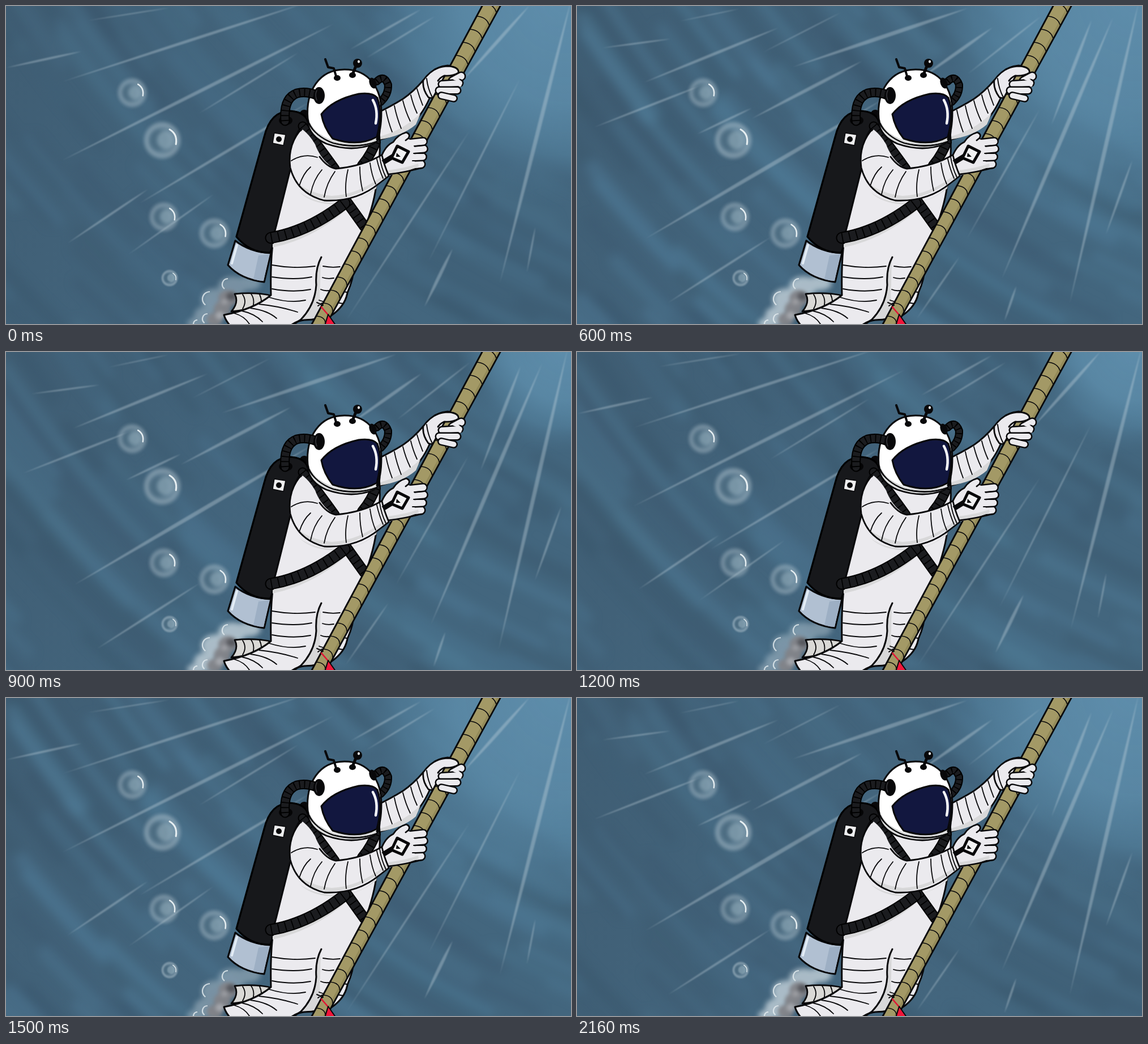
Animation of 998 by 561 pixels, one loop 2400 ms. Source, as an HTML page:

```html
<!DOCTYPE html>
<html lang="en">
<head>
<meta charset="utf-8">
<title>Diver on a rope</title>
<style>
  html, body { margin: 0; width: 100%; height: 100%; overflow: hidden; background: #45677f; }
  svg { display: block; width: 100%; height: 100%; }
</style>
</head>
<body>
<svg id="stage" viewBox="0 0 998 561" preserveAspectRatio="none"></svg>
<script>
const SUIT = '#ebeaee', SHADE = '#d8d8d9', INK = '#08080a', RUBBER = '#1b1c1f';

const rng = seed => () => {
  seed = (seed * 1664525 + 1013904223) >>> 0;
  return seed / 4294967296;
};
const path = (d, fill = 'none', stroke = INK, w = 3, extra = '') =>
  `<path d="${d}" fill="${fill}" stroke="${stroke}" stroke-width="${w}" ${extra}/>`;
const oval = (x, y, rx, ry, fill, extra = '') =>
  `<ellipse cx="${x}" cy="${y}" rx="${rx}" ry="${ry}" fill="${fill}" ${extra}/>`;
const group = (body, attrs = '') => `<g ${attrs}>${body}</g>`;

const blurs = [1, 3, 5, 9].map(n =>
  `<filter id="b${n}" filterUnits="userSpaceOnUse" x="-60" y="-60" width="1118" height="681" color-interpolation-filters="sRGB"><feGaussianBlur stdDeviation="${n}"/></filter>`).join('');
const glow = (id, r) =>
  `<radialGradient id="${id}" gradientUnits="userSpaceOnUse" cx="985" cy="-10" r="${r}">
    <stop offset="0" stop-color="#5e8dab"/><stop offset=".5" stop-color="#5a88a5" stop-opacity=".95"/>
    <stop offset=".75" stop-color="#5583a0" stop-opacity=".6"/><stop offset="1" stop-color="#4a718c" stop-opacity="0"/>
  </radialGradient>`;
const defs = `<defs>${blurs}${glow('wide', 365)}${glow('full', 385)}${glow('small', 190)}
  <linearGradient id="water" x1="0" y1="0" x2="1" y2="0.3">
    <stop offset="0" stop-color="#3f5d73"/><stop offset=".55" stop-color="#43657d"/><stop offset="1" stop-color="#43667e"/>
  </linearGradient></defs>`;

// Soft ripples: shallow arcs around a point far beyond the top right corner.
function water(seed, light, dark, glowId) {
  const rnd = rng(seed), cx = 1700, cy = -1100;
  let arcs = '';
  for (let r = 1300; r < 2420; r += 13) {
    const at = a => `${(cx + r * Math.cos(a)).toFixed(0)},${(cy + r * Math.sin(a)).toFixed(0)}`;
    for (let k = 0; k < 2; k++) {
      const a = 1.8 + rnd() * 0.75, span = 0.07 + rnd() * 0.17;
      const bright = rnd() < 0.5;
      arcs += path(`M${at(a)}A${r},${r} 0 0 1 ${at(a + span)}`, 'none',
        bright ? '#507c98' : '#385368', 12 + rnd() * 18,
        `opacity="${(bright ? light : dark) * (0.5 + rnd() * 0.5)}"`);
    }
  }
  return `<rect width="998" height="561" fill="url(#water)"/>` +
    group(arcs, 'filter="url(#b9)" stroke-linecap="round"') +
    `<rect width="998" height="561" fill="url(#${glowId})"/>`;
}

// Each ray is a thin spindle: two ends and a width.
function rays(list) {
  let out = '';
  for (let i = 0; i < list.length; i += 5) {
    const [x1, y1, x2, y2, w] = list.slice(i, i + 5);
    const len = Math.hypot(x2 - x1, y2 - y1);
    const nx = (y1 - y2) / len * w, ny = (x2 - x1) / len * w;
    const mx = x1 + (x2 - x1) * 0.6, my = y1 + (y2 - y1) * 0.6;
    out += path(`M${x1},${y1}Q${mx + nx},${my + ny} ${x2},${y2}Q${mx - nx},${my - ny} ${x1},${y1}Z`, '#c3d3dc', 'none', 0);
  }
  return group(out, 'opacity=".37" filter="url(#b1)"');
}

const raysA = rays([
  143, 26, 290, 3, 2, 0, 109, 134, 80, 4, 98, 134, 525, -4, 5, 98, 273, 580, 31, 6,
  340, 190, 517, 82, 3, 607, 77, 733, 6, 4, 636, 92, 758, 18, 3, 108, 419, 251, 323, 4,
  215, 439, 367, 332, 3, 236, 348, 535, 170, 5, 739, 531, 789, 428, 6, 745, 453, 908, 128, 3,
  805, 133, 924, 0, 6, 872, 490, 998, -10, 7, 920, 470, 935, 390, 3, 600, 556, 819, 220, 3]);
const raysB = rays([
  44, 74, 166, 58, 3, 180, 27, 287, 5, 2, 118, 135, 357, 38, 5, 30, 214, 225, 138, 4,
  212, 226, 309, 180, 4, 328, 82, 467, 11, 2, 308, 199, 504, 97, 6, 380, 108, 690, 4, 7,
  120, 411, 540, 165, 7, 160, 524, 342, 408, 4, 605, 129, 734, 38, 6, 690, 120, 820, 18, 3,
  838, 210, 909, 25, 6, 750, 482, 947, 20, 7, 870, 526, 992, -6, 7, 934, 404, 981, 272, 4,
  600, 552, 676, 442, 3, 755, 556, 776, 494, 4, 688, 412, 817, 183, 3]);

function bubble(x, y, r) {
  const soft = `filter="url(#b${r < 20 ? 1 : 3})"`;
  return group(
    oval(0, 0, r * 1.05, r * 1.05, '#a3b8c4', `opacity=".32" ${soft}`) +
    `<circle r="${r * 0.88}" fill="none" stroke="#c3d1d9" stroke-width="${r * 0.22}" opacity=".3" ${soft}/>` +
    oval(-r * 0.2, 0, r * 0.52, r * 0.58, '#46667b', `opacity=".75" ${soft}`) +
    oval(r * 0.2, -r * 0.02, r * 0.5, r * 0.52, '#8ba6b5', `opacity=".7" ${soft}`) +
    path(`M${r * 0.42},${-r * 0.62}Q${r * 0.88},${-r * 0.35} ${r * 0.78},${r * 0.22}`, 'none', '#e6eef1', r * 0.1),
    `transform="translate(${x},${y})" stroke-linecap="round"`);
}
const bubbles = bubble(223, 153, 24) + bubble(276, 237, 31) + bubble(279, 372, 24) +
  bubble(368, 401, 25) + bubble(289, 480, 14);

function smoke(white) {
  const puffs = [[428, 489, 22, 13], [400, 495, 25, 18], [370, 518, 25, 20], [352, 547, 20, 17], [336, 560, 16, 10]];
  const soot = [[392, 516, 17, 15], [382, 535, 15, 15], [369, 553, 14, 12]];
  const ring = (x, y, r) => path(`M${x},${y - r}A${r},${r} 0 0 0 ${x - r * 0.6},${y + r * 0.8}`, 'none', '#e9f0f3', 2.2, 'opacity=".8"');
  return group(puffs.map(p => oval(...p, '#bccbd4')).join(''), `opacity="${white}" filter="url(#b5)"`) +
    ring(392, 491, 10) + ring(360, 517, 13) + ring(356, 552, 9) + ring(338, 561, 7) +
    group(soot.map(p => oval(...p, '#828388')).join('') + oval(398, 512, 9, 7, '#56565b') +
      oval(378, 546, 8, 7, '#a9aaae') + oval(386, 522, 6, 5, '#9d9ea2'), 'opacity=".95" filter="url(#b3)"');
}

// Ribbed rubber: outline, core and cross ribs along one path.
const ribbed = (d, w, gap = 9) => path(d, 'none', '#000', w) + path(d, 'none', RUBBER, w - 4) +
  path(d, 'none', '#000', w - 3, `stroke-dasharray="1.8 ${gap}" stroke-linecap="butt"`);

const finger = (x1, y1, x2, y2, w) =>
  path(`M${x1},${y1}L${x2},${y2}`, 'none', INK, w + 5) + path(`M${x1},${y1}L${x2},${y2}`, 'none', SUIT, w);
const seams = (d, w = 1.8) => path(d, 'none', INK, w);

const tank =
  oval(527, 190, 8, 7, INK) +
  path('M405,414L392,457Q414,482 456,487L468,436Q430,434 405,414Z', '#b1c0d2', INK, 3.2) +
  path('M446,440L437,482Q448,485 455,485L465,438Z', '#9dafc4', 'none', 0) +
  path('M408,422L399,454', 'none', '#e4edf6', 4) +
  path('M407,407L456,231Q467,185 502,185Q530,187 534,207L520,290L467,435Q431,436 407,407Z', '#17181b', '#000', 3.2) +
  path('M474,224L494,227L490,246L471,242Z', '#eeeeef', INK, 1.4) + oval(482, 235, 5, 5, INK);

const backArm =
  path('M655,189Q680,177 701,164Q720,151 737,131L748,163Q734,195 711,213Q692,228 656,237Z', SUIT, INK, 2.8) +
  path('M657,231Q692,222 716,203L732,190L724,209Q700,230 657,236Z', SHADE, 'none', 0) +
  seams('M671,184Q675,204 682,222M686,176Q690,196 698,216M701,167Q706,187 714,203M715,157Q719,174 726,189M726,146Q730,160 736,175') +
  path('M737,131Q754,107 780,105Q796,106 799,116L782,145Q761,167 746,161Q735,146 737,131Z', SUIT, INK, 2.8) +
  seams('M743,128Q745,146 753,161', 2);

const body =
  path('M404,508Q438,504 470,511Q456,533 398,539Q412,523 404,508Z', '#dad9d6', INK, 2.8) +
  seams('M418,509Q426,521 418,534M433,508Q440,518 436,531M448,509Q452,517 451,527') +
  path('M524,210Q500,240 503,285L478,385Q466,425 468,510Q438,535 385,545Q388,556 398,566L500,566Q511,556 526,554Q556,553 576,545Q599,529 603,506Q614,482 615,456L637,384Q655,332 655,300Q663,265 659,222Z', SUIT, INK, 3) +
  path('M556,446Q547,466 549,492Q547,527 525,552Q557,552 570,540Q551,535 555,492Z', SHADE, 'none', 0) +
  path('M471,420Q538,406 600,355L601,360Q540,412 471,426Z', SHADE, 'none', 0) +
  path('M518,328Q548,351 602,347Q640,338 655,316L654,322Q615,354 565,349Q535,345 518,328Z', SHADE, 'none', 0) +
  path('M557,443Q546,463 548,492Q546,527 521,553Q509,561 503,566', 'none', INK, 3) +
  seams('M470,457Q508,464 546,459M470,478Q509,484 540,478M470,499Q507,506 538,500M465,514Q500,525 529,519' +
    'M447,526Q485,530 515,540M432,533Q462,537 478,551M417,538Q440,543 453,557M403,542Q421,547 430,561' +
    'M560,459Q575,462 590,460M559,479Q568,482 579,480M556,500Q562,503 570,502M553,519L562,522' +
    'M603,464L614,461M596,484L609,482M588,503L603,505M577,522L595,525');

const straps =
  ribbed('M524,212Q546,238 581,287', 17) +
  ribbed('M653,240Q645,262 629,281', 18) +
  ribbed('M600,343L633,389', 19) +
  ribbed('M468,409Q534,398 598,348', 21, 11);

const helmet =
  ribbed('M655,133Q668,120 675,139Q676,156 662,169', 14, 6) +
  path('M533,205Q536,230 566,243Q612,259 650,243Q661,233 660,220Z', '#dcdddd', INK, 2.8) +
  path('M533,199C529,150 553,112 598,112C642,112 663,146 663,187Q663,221 654,237Q618,251 576,239Q537,224 533,199Z', '#fff', INK, 3) +
  path('M536,206Q546,229 578,239Q620,249 653,237', 'none', '#dddede', 3) +
  path('M535,206Q546,230 578,242Q620,253 655,239', 'none', INK, 2.2) +
  path('M557,191Q577,165 623,155Q648,152 656,162Q666,190 655,231Q622,249 577,234Q561,214 557,191Z', '#12173f', INK, 3) +
  path('M648,166Q658,184 653,207', 'none', '#f7f8fb', 4.5) +
  oval(648, 136, 6, 10, INK, 'transform="rotate(-22 648 136)"') +
  oval(585, 127, 6, 5, INK) + path('M584,127L579,110L569,108L564,94', 'none', INK, 4) +
  oval(612, 122, 6, 5, INK) + path('M612,121L618,106', 'none', INK, 5) +
  oval(621, 101, 8, 8, INK) + oval(623, 98, 2, 2.6, '#fff') +
  oval(494, 202, 12, 8, '#050506') +
  ribbed('M493,203Q490,162 514,154Q530,150 548,157', 17, 7) +
  oval(553, 158, 10, 15, INK) + path('M549,149Q545,157 549,166', 'none', '#3a3b3f', 1.5);

function rope() {
  const left = y => 841 - 0.536 * y, right = y => 873 - 0.547 * y;
  let turns = '';
  for (let y = -5; y < 575; y += 23) {
    const e = y + 17;
    turns += `M${left(y)},${y}Q${left(y) + 18},${y + 1} ${right(e)},${e}`;
  }
  return path(`M${left(-9)},-9L${right(-9)},-9L${right(570)},570L${left(570)},570Z`, '#a39966', INK, 2.9) +
    path(`M${right(-9) - 4},-9L${right(570) - 4},570`, 'none', '#938a59', 4) + path(turns, 'none', INK, 1.6) +
    path('M549,523L560,528M551,529L558,524', 'none', INK, 2) +
    path('M557,531L570,546', 'none', '#e41234', 2.5) +
    path('M569,544L583,564L563,564Z', '#f0163a', INK, 2);
}

const topHand =
  path('M758,121Q766,107 782,106Q801,108 799,118Q789,124 774,123Q767,125 763,130Z', SUIT, 'none', 0) +
  path('M757,112Q768,106 782,106Q801,108 799,118Q789,124 774,123Q767,126 763,132', 'none', INK, 2.8) +
  finger(789, 132, 804, 124, 12) + finger(770, 138, 801, 136, 10) +
  finger(765, 149, 797, 149, 10) + finger(769, 158, 791, 163, 9) +
  path('M792,128Q802,130 802,140', 'none', SUIT, 5);

const frontArm =
  path('M524,218Q497,245 502,285Q514,331 562,343Q619,346 659,313L676,300L665,262Q630,283 580,287Q556,272 546,244Q536,227 524,218Z', SUIT, 'none', 0) +
  path('M514,312Q532,338 572,341Q620,341 674,299L672,294Q625,333 575,335Q538,331 514,312Z', SHADE, 'none', 0) +
  path('M521,218Q497,245 502,285Q514,331 562,343Q619,346 659,313L676,300M554,266Q567,284 582,287Q630,283 665,262', 'none', INK, 2.8) +
  seams('M504,273Q526,259 550,267M538,284Q525,295 518,317M558,289Q543,306 538,332M581,292Q566,313 562,337M604,289Q598,314 601,336M625,284Q625,306 630,326M643,277Q646,299 653,314M655,270Q659,288 666,304');

const frontHand =
  finger(711, 281, 733, 279, 12) + finger(712, 267, 736, 266, 11) +
  finger(712, 254, 738, 252, 11) + finger(710, 242, 737, 239, 11) +
  path('M664,263Q671,246 684,240Q692,227 707,223Q715,226 711,235L721,238L722,286Q702,294 676,299Q665,281 664,263Z', SUIT, 'none', 0) +
  path('M697,291Q718,289 729,283L728,278Q705,286 674,290L677,298Z', SHADE, 'none', 0) +
  path('M676,299Q668,281 664,263Q671,246 684,240Q692,227 707,223Q715,226 711,233L706,237M676,297Q706,293 733,286', 'none', INK, 2.8) +
  seams('M721,247L738,246M720,260L737,260M718,273L735,273M660,266Q663,286 671,302') +
  path('M666,276L684,265', 'none', INK, 9, 'stroke-linecap="butt"') +
  path('M691,247L711,257L700,276L681,268Z', '#f2f2f3', INK, 5) +
  path('M690,259L697,266L689,266Z', INK, 'none', 0);

const scenes = [water(7, 0.3, 0.4, 'wide'), water(41, 0.62, 0.32, 'full'), water(93, 0.45, 0.42, 'small')];
const stage = document.getElementById('stage');
stage.innerHTML = defs +
  scenes.map(s => group(s, 'class="water"')).join('') +
  [raysA, raysB].map(s => group(s, 'class="rays"')).join('') + bubbles +
  [0.45, 0.85].map(s => group(smoke(s), 'class="smoke"')).join('') +
  group(tank + backArm + body + straps + helmet + rope() + topHand + frontArm + frontHand,
    'stroke-linecap="round" stroke-linejoin="round"');

const layers = ['water', 'rays', 'smoke'].map(c => [...stage.querySelectorAll('.' + c)]);
const show = (list, n) => list.forEach((el, i) => el.setAttribute('display', i === n ? 'inline' : 'none'));
const WATER = [0, 0, 1, 2, 2, 1, 0, 0];
let last = -1;

function draw(now) {
  const step = Math.floor(now % 2400 / 300);
  if (step !== last) {
    last = step;
    const beat = (step >> 1) % 2;
    show(layers[0], WATER[step]);
    show(layers[1], beat);
    show(layers[2], beat);
  }
}
const start = performance.now();
function loop() {
  draw(performance.now() - start);
  requestAnimationFrame(loop);
}
loop();
</script>
</body>
</html>
```
